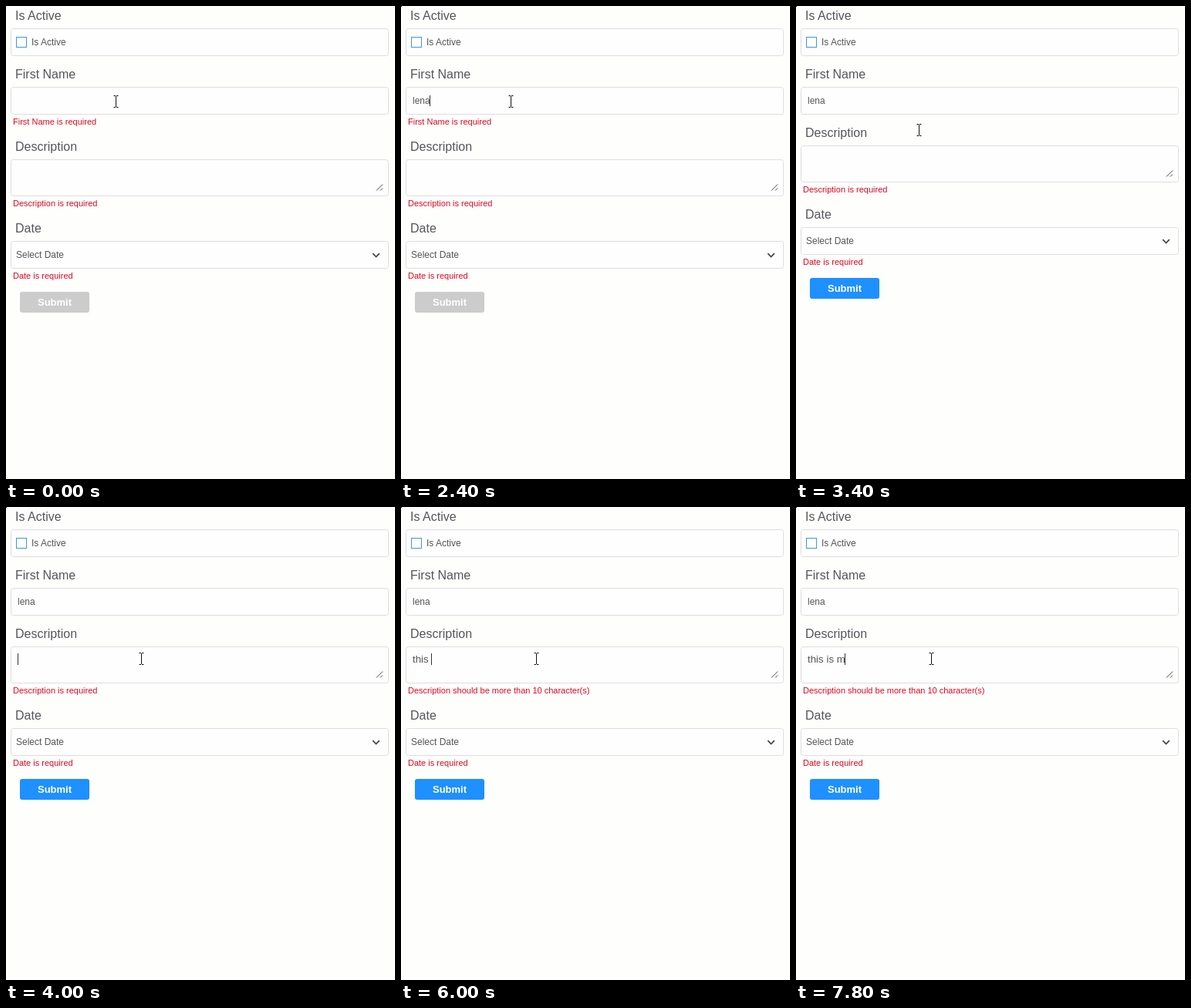
An HTML page for the animation above (8000 ms loop, 504x614 px).

```html
<!DOCTYPE html>
<html lang="en">
<head>
<meta charset="utf-8">
<title>Form validation</title>
<style>
  html, body { margin: 0; width: 100%; height: 100%; overflow: hidden; background: #fefefd; }
  svg { display: block; width: 504px; height: 614px; }
  text { font: 12px Arial, "Liberation Sans", sans-serif; fill: #55555a; white-space: pre; }
  .label { font-size: 16px; }
  .error { font-size: 11px; fill: #dc0822; }
  .area { font-size: 13.333px; }
  .button { font-size: 13px; font-weight: bold; fill: #fff; }
  .field { fill: #fefefe; stroke: #dedede; }
  .line { fill: none; stroke: #444; }
  .caret { fill: #333; }
</style>
</head>
<body>
<svg viewBox="0 0 504 614">
  <text class="label" x="12" y="18">Is Active</text>
  <rect class="field" x="6.5" y="29.5" width="489" height="35" rx="3"/>
  <rect x="13.5" y="40.5" width="13" height="13" fill="#fff" stroke="#3c9bd6"/>
  <text x="33" y="51">Is Active</text>

  <text class="label" x="12" y="94">First Name</text>
  <rect class="field" x="6.5" y="105.5" width="489" height="35" rx="3"/>
  <text id="name" x="15" y="127"></text>
  <rect id="nameCaret" class="caret" y="116" width="1" height="14"/>
  <text id="nameError" class="error" x="9" y="154">First Name is required</text>

  <g id="lower">
    <text class="label" x="12" y="188">Description</text>
    <rect class="field" x="6.5" y="199.5" width="489" height="47" rx="3"/>
    <path class="line" d="M480 239.5l8-8M485 239.5l3-3"/>
    <text id="description" class="area" x="15" y="220"></text>
    <rect id="descriptionCaret" class="caret" y="208" width="1" height="15"/>
    <text id="descriptionError" class="error" x="9" y="260"></text>

    <text class="label" x="12" y="294">Date</text>
    <rect class="field" x="6.5" y="305.5" width="489" height="35" rx="3"/>
    <text x="13" y="327">Select Date</text>
    <path class="line" stroke-width="1.7" d="M475.2 321.2l4.3 4.3l4.3-4.3"/>
    <text class="error" x="9" y="354">Date is required</text>

    <rect id="submit" x="18" y="371" width="90" height="27" rx="3"/>
    <text class="button" x="41" y="389">Submit</text>
  </g>

  <path id="pointer" d="M-3-7.5h2.5M.5-7.5h2.5M0-7V7M-3 7.5h2.5M.5 7.5h2.5" fill="none" stroke="#111"/>
  <rect id="corner" width="1" height="1" fill="#000"/>
</svg>
<script>
const LOOP = 8000, STEP = 200;
const $ = id => document.getElementById(id);

// Each entry: [start time, text, caret visible]
const nameStates = [
  [0, '', false], [1400, '', true], [1600, 'l', true], [1800, 'le', true],
  [2200, 'len', true], [2400, 'lena', true], [3000, 'lena', false]
];
const descriptionStates = [
  [0, '', false], [4000, '', true], [4600, '', false],
  [5000, 't', true], [5200, 'th', true], [5400, 'this', true], [5600, 'this ', true],
  [6200, 'this ', false], [6600, 'this ', true],
  [7000, 'this i', true], [7200, 'this is ', true], [7800, 'this is m', true]
];

const show = (id, visible) => $(id).setAttribute('visibility', visible ? 'visible' : 'hidden');

function type(id, states, t) {
  const [, value, caretOn] = states.filter(([start]) => start <= t).pop();
  const text = $(id);
  text.textContent = value;
  const width = value ? text.getComputedTextLength() : 0;
  $(id + 'Caret').setAttribute('x', 15 + Math.floor(width));
  show(id + 'Caret', caretOn);
}

function draw(t) {
  const named = t >= 3000;
  type('name', nameStates, t);
  type('description', descriptionStates, t);
  show('nameError', !named);
  $('descriptionError').textContent =
    t < 6000 ? 'Description is required' : 'Description should be more than 10 character(s)';
  $('lower').setAttribute('transform', `translate(0 ${named ? -18 : 0})`);
  $('submit').setAttribute('fill', named ? '#1e90ff' : '#cccccc');

  const p = Math.min(1, Math.max(0, (t - 3000) / 800));
  const ease = p * p * (3 - 2 * p);
  const x = Math.round(142 + 33 * ease) + .5, y = Math.round(124 + 73 * ease);
  $('pointer').setAttribute('transform', `translate(${x} ${y})`);
  show('corner', t >= 600);
}

let last = -1;
function tick() {
  const t = Math.floor(performance.now() % LOOP / STEP) * STEP;
  if (t !== last) draw(last = t);
  requestAnimationFrame(tick);
}
tick();
</script>
</body>
</html>
```
